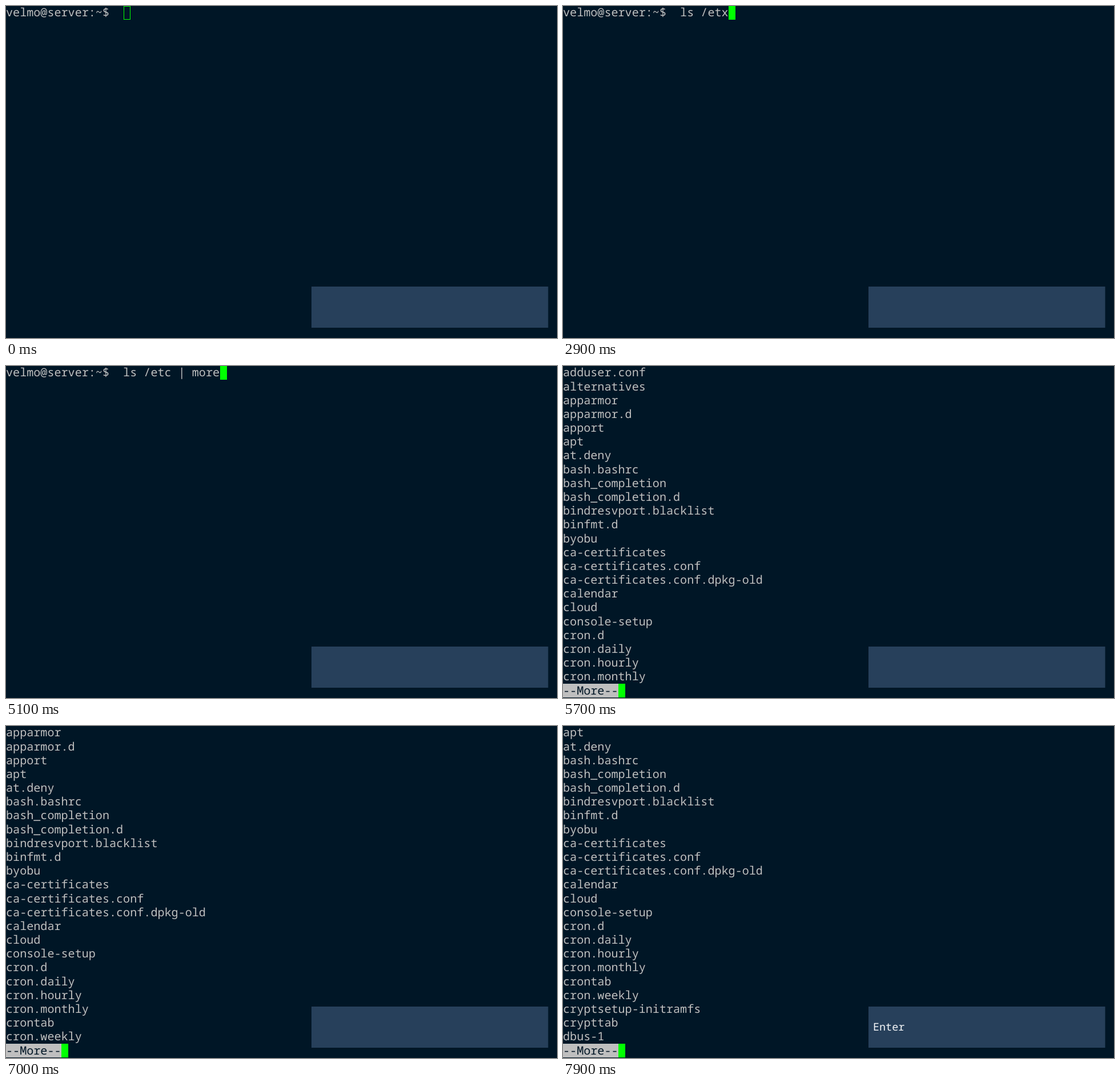
These frames come from a looping animation (965x581 px, 8000 ms). An HTML page:

```html
<!DOCTYPE html>
<html lang="en">
<head>
<meta charset="utf-8">
<title>Terminal session</title>
<style>
  html, body { margin: 0; width: 100%; height: 100%; overflow: hidden; background: #001626; }
  svg { display: block; width: 965px; height: 581px; }
  text {
    font-family: "Noto Sans Mono", "DejaVu Sans Mono", monospace;
    white-space: pre;
    text-rendering: geometricPrecision;
  }
  #rows text, #more text { font-size: 20.13px; fill: #bfbfbf; }
  #more text { fill: #001626; }
  #keys { font-size: 18.46px; font-weight: 500; fill: #f4f6f8; }
</style>
</head>
<body>
<svg viewBox="0 0 965 581">
  <rect width="965" height="581" fill="#001626"/>
  <g id="more"><rect fill="#bfbfbf"/><text>--More--</text></g>
  <g id="rows"></g>
  <rect id="cursor" stroke="#00ff00"/>
  <rect x="535" y="491" width="414.5" height="72" fill="#27405b"/>
  <text id="keys" x="543" y="533"></text>
</svg>
<script>
const LOOP = 8000, CELL_W = 12.08, CELL_H = 24.18, BASELINE = 18.4, PAGE = 23;
const PROMPT = "velmo@server:~$  ";

const FILES = `adduser.conf alternatives apparmor apparmor.d apport apt at.deny
  bash.bashrc bash_completion bash_completion.d bindresvport.blacklist binfmt.d byobu
  ca-certificates ca-certificates.conf ca-certificates.conf.dpkg-old calendar cloud
  console-setup cron.d cron.daily cron.hourly cron.monthly crontab cron.weekly
  cryptsetup-initramfs crypttab dbus-1`.split(/\s+/);

// [time, typed command, pressed keys]
const TYPING = [
  [0, "", ""],
  [1000, "l", ""],
  [1100, "ls", "L"],
  [1200, "ls", "S"],
  [1300, "ls ", ""],
  [1400, "ls ", "Space"],
  [1500, "ls ", "L Shift"],
  [1900, "ls /", ""],
  [2000, "ls /e", "E"],
  [2100, "ls /et", "T"],
  [2200, "ls /et", ""],
  [2900, "ls /etx", ""],
  [3000, "ls /etx", "X"],
  [3100, "ls /etx", ""],
  [3400, "ls /et", ""],
  [3500, "ls /etc", "C"],
  [3600, "ls /etc ", "Space"],
  [3700, "ls /etc ", "L Ctrl + R Alt"],
  [4400, "ls /etc |", "L Ctrl + R Alt + /"],
  [4500, "ls /etc |", "L Ctrl + R Alt"],
  [4600, "ls /etc |", ""],
  [4700, "ls /etc | ", "Space"],
  [4800, "ls /etc | m", "M"],
  [4900, "ls /etc | mo", "O"],
  [5000, "ls /etc | mor", "R"],
  [5100, "ls /etc | more", ""],
  [5200, "ls /etc | more", "E"],
  [5300, "ls /etc | more", ""]
];

// [press, release] of Enter: the first opens the pager, the others scroll it
const ENTERS = [[5600, 5700], [6400, 6600], [6800, 7000], [7200, 7300], [7600, 7700], [7900, 8000]];

const byId = id => document.getElementById(id);
const set = (node, attrs) => {
  for (const name in attrs) node.setAttribute(name, attrs[name]);
};
const baseline = row => row * CELL_H + BASELINE;
const lastStarted = (steps, t) => steps.filter(step => step[0] <= t).pop();

const rows = Array.from({ length: PAGE }, (_, row) => {
  const line = document.createElementNS("http://www.w3.org/2000/svg", "text");
  set(line, { x: 0, y: baseline(row) });
  return byId("rows").appendChild(line);
});

const more = byId("more"), cursor = byId("cursor"), keys = byId("keys");
set(more.firstChild, { y: 556, width: 97, height: 24 });
set(more.lastChild, { y: baseline(PAGE) });

function placeCursor(col, row, focused) {
  const x = Math.round(col * CELL_W + 0.3), y = Math.round(row * CELL_H);
  const inset = focused ? 0 : 0.5;
  set(cursor, {
    x: x + inset, y: y + inset,
    width: 12 - 2 * inset, height: 24 - 2 * inset,
    fill: focused ? "#00ff00" : "none",
    "stroke-width": focused ? 0 : 1
  });
}

function render(t) {
  const enter = lastStarted(ENTERS, t);
  let lines, pressed;
  if (enter) {
    const top = ENTERS.indexOf(enter);
    lines = FILES.slice(top, top + PAGE);
    pressed = t < enter[1] ? "Enter" : "";
    placeCursor("--More--".length, PAGE, true);
  } else {
    const [, typed, held] = lastStarted(TYPING, t);
    lines = [PROMPT + typed];
    pressed = held;
    placeCursor(lines[0].length, 0, t >= 300);
  }
  rows.forEach((row, i) => { row.textContent = lines[i] || ""; });
  keys.textContent = pressed;
  set(more, { visibility: enter ? "visible" : "hidden" });
}

const start = performance.now();
function tick() {
  render((performance.now() - start) % LOOP);
  requestAnimationFrame(tick);
}
tick();
</script>
</body>
</html>
```
